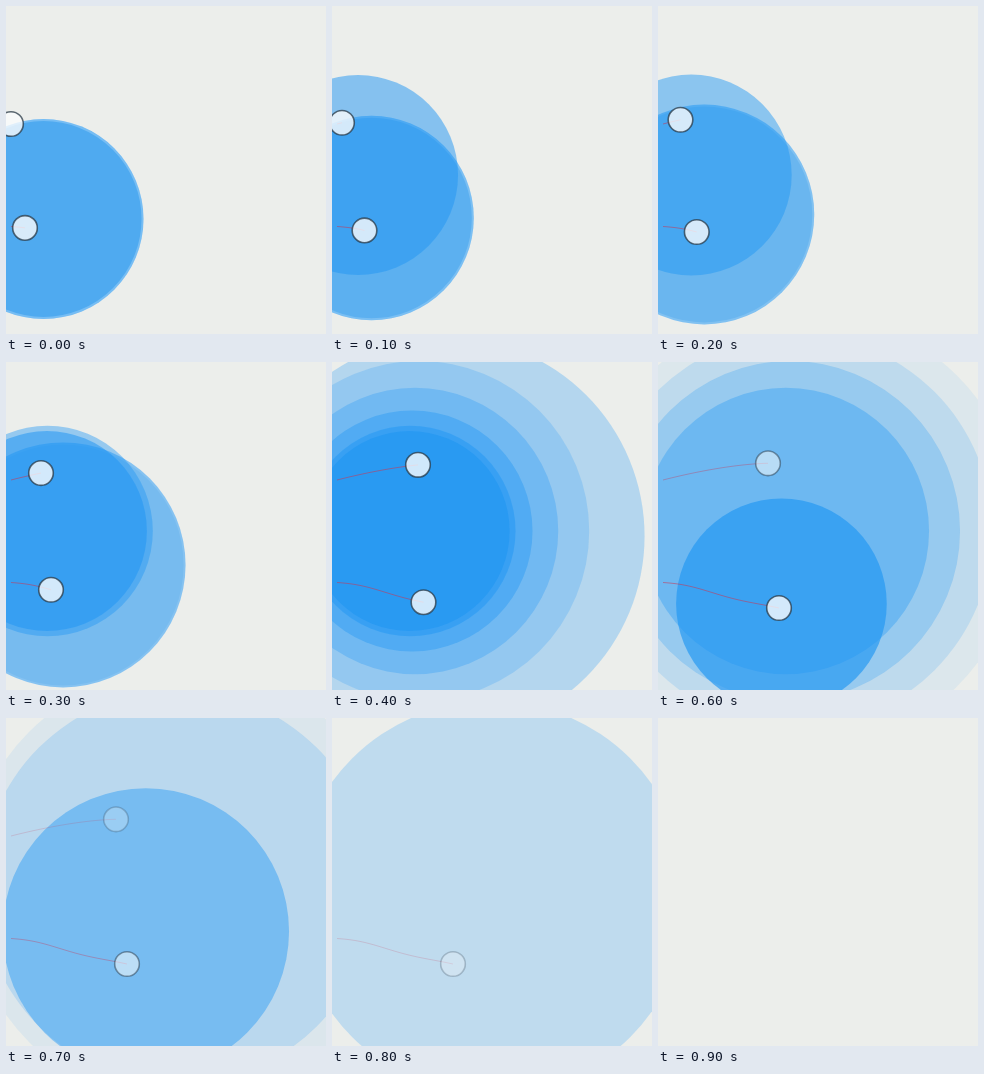
An HTML page with a canvas for the animation above (1100 ms loop, 320 by 328 pixels).

```html
<!DOCTYPE html>
<html lang="en">
<head>
<meta charset="utf-8">
<title>Touch ripples</title>
<style>
  html, body { margin: 0; width: 100%; height: 100%; overflow: hidden; background: #eceeeb; }
  canvas { display: block; width: 320px; height: 328px; }
</style>
</head>
<body>
<canvas id="stage" width="320" height="328"></canvas>
<script>
const ctx = document.getElementById('stage').getContext('2d');
const LOOP = 1100, STEP = 100, LAST = 9;

const clamp = u => Math.max(0, Math.min(1, u));
const mix = (a, b, u) => a + (b - a) * u;
const ease = u => (1 - Math.cos(Math.PI * clamp(u))) / 2;

// Linear track through [step, value] points, held after the last one
function track(points, at) {
  const i = points.findIndex(p => p[0] > at);
  if (i < 0) return points[points.length - 1][1];
  const [a, b] = [points[i - 1], points[i]];
  return mix(a[1], b[1], (at - a[0]) / (b[0] - a[0]));
}

// The motion speeds up after the third step
const clock = step => track([[0, 0], [1, .65], [3, 2.1], [4, 5.1], [6, 8.1], [9, 14.1]], step);

// A single ripple glides from its touch point towards the middle
const glide = (from, to) => age => {
  const u = ease(age / 6.7);
  return [mix(from[0], to[0], u), mix(from[1], to[1], u)];
};

// Ripples in a series share a centre that drifts to the right
const drift = (age, now) => [20 + 9 * now + .45 * now * now + .6 * age * age, 169];

const ripples = [
  { born: 0, life: 8, strength: .77, rim: .22, place: glide([37.5, 213], [125, 168]) }
];
for (let i = 0; i < 5; i++) {
  ripples.push({ born: 1.1 + i, life: 7, strength: .5 + .03 * i, rim: 0, place: drift });
}
ripples.push({ born: 7.1, life: 7, strength: .77, rim: 0, place: glide([121, 246], [166, 168]) });

const fingers = [
  { from: 5, to: 110, lift: 5,
    x: [[0, 5], [1, 10], [3, 35], [4, 86], [6, 110]],
    y: v => 101.3 + 16.7 * (1 - v) ** 1.6 },
  { from: 5, to: 121, lift: 6,
    x: [[0, 19], [1, 32.5], [3, 45], [4, 91.5], [6, 121]],
    y: v => 220.5 + 25.5 * (v - .11 * (1 - v) * Math.sin(2 * Math.PI * v)) }
];

function disc(x, y, r) {
  ctx.beginPath();
  ctx.arc(x, y, r, 0, Math.PI * 2);
}

function drawRipple({ born, life, strength, rim, place }, now) {
  if (now < born - .5) return;
  const age = Math.max(0, now - born);
  const [x, y] = place(age, now);
  const r = 100 + 140 * ease(age / 8);
  ctx.globalAlpha = strength * clamp(1 - age / life);
  ctx.fillStyle = '#2196f3';
  disc(x, y, r);
  ctx.fill();
  ctx.globalAlpha = rim * clamp(1 - age / 4);
  ctx.strokeStyle = '#fff';
  ctx.lineWidth = 2;
  disc(x, y, r - 1);
  ctx.stroke();
}

function drawFinger({ from, to, lift, x, y }, step) {
  const end = track(x, step);
  const yAt = px => y((px - from) / (to - from));
  ctx.globalAlpha = clamp(1 - (step - lift) / 3);
  ctx.beginPath();
  for (let px = from; px < end; px += 2) ctx.lineTo(px, yAt(px));
  ctx.lineTo(end, yAt(end));
  ctx.strokeStyle = 'rgba(200, 55, 85, .55)';
  ctx.lineWidth = 1;
  ctx.stroke();

  disc(end, yAt(end), 12.3);
  ctx.fillStyle = 'rgba(250, 251, 252, .8)';
  ctx.fill();
  ctx.strokeStyle = 'rgba(40, 56, 70, .75)';
  ctx.lineWidth = 1.6;
  ctx.stroke();
}

function draw(step) {
  const now = clock(step);
  ctx.globalAlpha = 1;
  ctx.fillStyle = '#eceeeb';
  ctx.fillRect(0, 0, 320, 328);
  ripples.forEach(r => drawRipple(r, now));
  fingers.forEach(f => drawFinger(f, step));
}

const start = performance.now();
function tick() {
  const t = (performance.now() - start) % LOOP;
  draw(Math.min(LAST, Math.floor(t / STEP)));
  requestAnimationFrame(tick);
}
tick();
</script>
</body>
</html>
```
